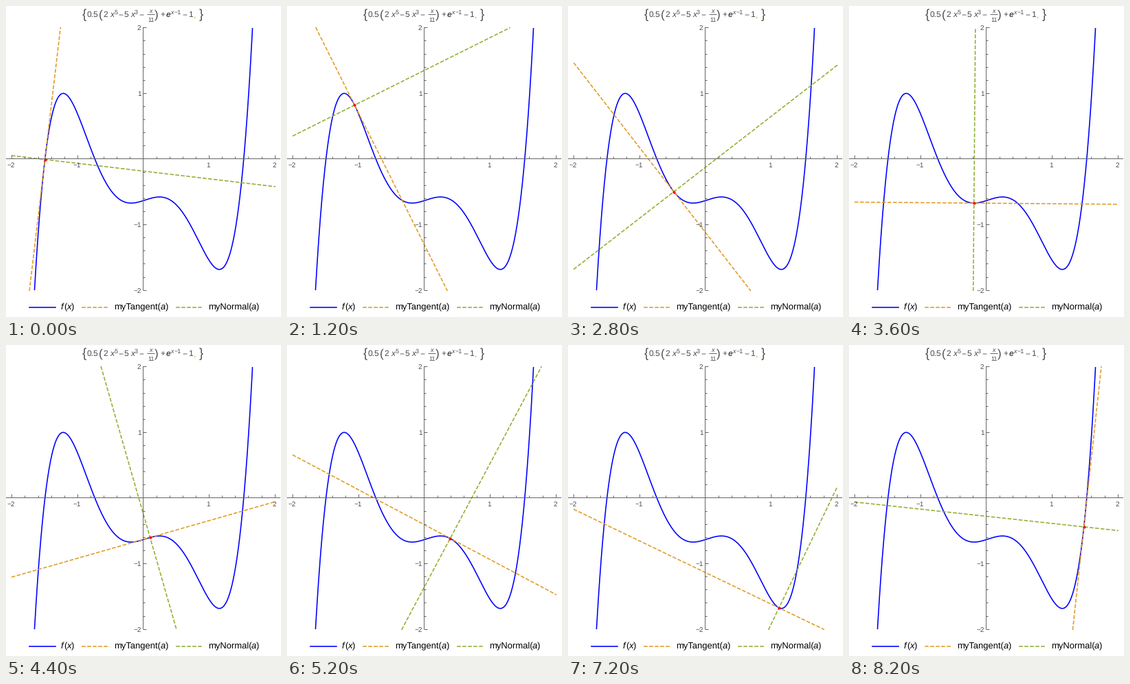
Write a matplotlib script that moves like this. It is 400 px wide and 453 px high and loops after 8.3 s.

```python
import numpy as np
import matplotlib
import matplotlib.pyplot as plt
from matplotlib.animation import FuncAnimation

W, H, DPI = 400, 453, 64
PT = 72 / DPI                      # points per pixel
CX, CY, UNIT = 200, 223, 95.6
FRAMES, INTERVAL = 83, 100
START, STEP = -1.5, 2 / 55

BLUE = (0, 0, 1)
ORANGE = (0.881, 0.611, 0.142)
GREEN = (0.560, 0.692, 0.195)
GRAY = (0.4, 0.4, 0.4)
INK = (0.3, 0.3, 0.3)

matplotlib.rcParams["font.family"] = "Liberation Sans"
matplotlib.rcParams["text.hinting"] = "none"
matplotlib.rcParams["toolbar"] = "None"

fig = plt.figure(figsize=(W / DPI, H / DPI), dpi=DPI, facecolor="white")
ax = fig.add_axes([0, 0, 1, 1])
ax.set_xlim(0, W)
ax.set_ylim(H, 0)
ax.axis("off")


def f(x):
    return 0.5 * (2 * x**5 - 5 * x**3 - x / 11) + np.exp(x - 1) - 1


def slope(x):
    return 0.5 * (10 * x**4 - 15 * x**2 - 1 / 11) + np.exp(x - 1)


def px(x):
    return CX + UNIT * x


def py(y):
    return CY - UNIT * y


def crisp(p):
    """Centre of the pixel that ends at or holds p."""
    return np.ceil(p) - 0.5


def stroke(xs, ys, color, dashed=False, z=2):
    style = dict(linestyle=(0, (2.5, 2.5)), dash_capstyle="projecting") if dashed else {}
    return ax.plot(xs, ys, color=color, lw=1.6 * PT, zorder=z, **style)[0]


def hair(x0, y0, x1, y1):
    ax.plot([x0, x1], [y0, y1], color=GRAY, lw=PT, zorder=5,
            solid_capstyle="butt", snap=False)


def write(x, y, s, size, color=INK, ha="left", **kw):
    ax.text(x, y, s, fontsize=size * PT, color=color, ha=ha, va="baseline", zorder=6, **kw)


def draw_axes():
    x0, y0 = crisp(CX), crisp(CY)
    hair(0, y0, 399, y0)
    hair(x0, py(2) - 0.8, x0, py(-2) - 0.2)
    for i in range(-10, 11):
        if i == 0:
            continue
        v = i / 5
        size = 5 if i % 5 == 0 else 3
        x, y = crisp(px(v)), crisp(py(v))
        hair(x, y0, x, y0 - size)
        hair(x0, y, x0 + size, y)
    for v in (-2, -1, 1, 2):
        label = str(v).replace("-", "\u2212")
        write(px(v) - 1.2, 235, label, 10, ha="center")
        write(196.5, py(v) + 3.3, label, 10, ha="right")


def draw_title():
    base = 16.3
    write(110.8, 17.8, "{", 18.5)
    write(280.2, 17.8, "}", 18.5)
    write(135.4, 17.6, "(", 17)
    write(216.4, 17.6, ")", 17)
    for x, s in ((117.4, "0.5"), (141.8, "2"), (163.2, "\u2212"), (172, "5"),
                 (193.4, "\u2212"), (224, "+"), (256.6, "\u2212"), (264.8, "1")):
        write(x, base, s, 12)
    write(272.6, base, ",", 12, ORANGE)
    for x in (151, 181):
        write(x, base, "x", 12, style="italic")
    write(232.2, base, "e", 12, style="italic", weight="bold")
    write(157.2, 11.6, "5", 9)
    write(187, 11.6, "3", 9)
    write(239.6, 11.6, "x", 9, style="italic")
    write(244.2, 11.6, "\u22121", 9)
    write(211, 9.6, "x", 9, ha="center", style="italic")
    write(211, 23.4, "11", 9, ha="center")
    hair(205.5, 12.5, 216.5, 12.5)


def draw_legend():
    y, base = 438.7, 442.3
    stroke([33.5, 71.5], [y, y], BLUE)
    stroke([110.5, 148.5], [y, y], ORANGE, True)
    stroke([247.5, 285.5], [y, y], GREEN, True)
    for x, s in ((84.4, "("), (95.4, ")"), (157, "myTangent("), (232.4, ")"),
                 (294, "myNormal("), (364.3, ")")):
        write(x, base, s, 13, "black")
    for x, s in ((80, "f"), (88.8, "x"), (225.2, "a"), (357.1, "a")):
        write(x, base, s, 13, "black", style="italic")


def clipped(x, y, dx, dy):
    """Part of a line inside the square |x|, |y| <= 2, from left to right."""
    if dx < 0:
        dx, dy = -dx, -dy
    tx = sorted(((-2 - x) / dx, (2 - x) / dx))
    ty = sorted(((-2 - y) / dy, (2 - y) / dy))
    t = np.array([max(tx[0], ty[0]), min(tx[1], ty[1])])
    return px(x + t * dx), py(y + t * dy)


draw_axes()
draw_title()
draw_legend()

xs = np.linspace(-2, 2, 1200)
curve = stroke(px(xs), py(f(xs)), BLUE)
curve.set_clip_path(plt.Rectangle((px(-2), py(2)), 4 * UNIT, 4 * UNIT,
                                  transform=ax.transData))
tangent = stroke([], [], ORANGE, True, 3)
normal = stroke([], [], GREEN, True, 4)
dot, = ax.plot([], [], "o", color="red", ms=4 * PT, mew=0, zorder=7)


def update(i):
    a = START + STEP * i
    y, m = f(a), slope(a)
    tangent.set_data(*clipped(a, y, 1, m))
    normal.set_data(*clipped(a, y, m, -1))
    dot.set_data([px(a)], [py(y)])
    return tangent, normal, dot


anim = FuncAnimation(fig, update, frames=FRAMES, interval=INTERVAL, repeat=True)
plt.show()
```
